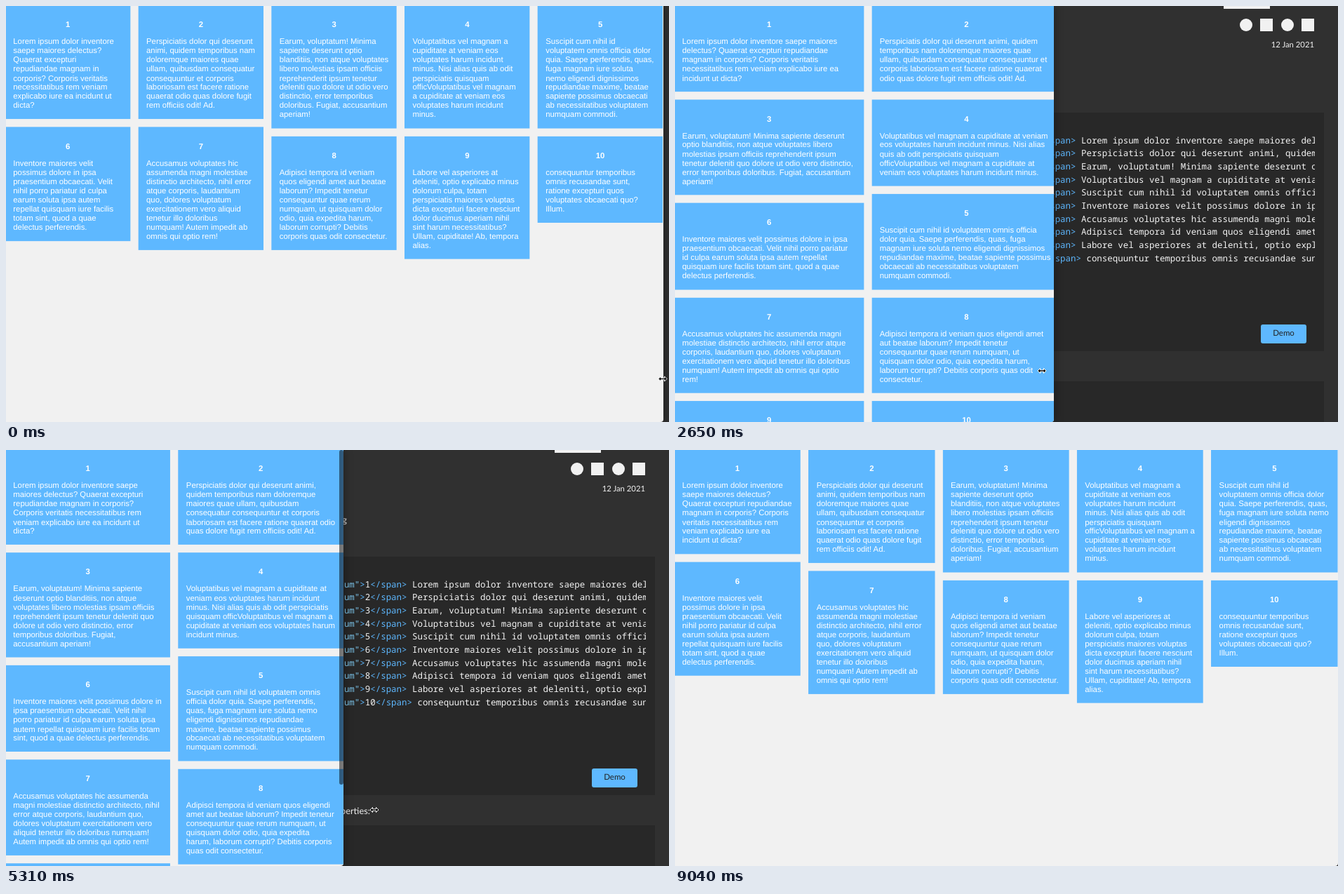
Write an HTML page that moves like this. It is 945 px wide and 593 px high and loops after 9.51 s.

```html
<!DOCTYPE html>
<html lang="en">
<head>
<meta charset="utf-8">
<title>Masonry resize</title>
<style>
  html, body { margin: 0; width: 100%; height: 100%; overflow: hidden; background: #303030; }
  #stage { position: relative; width: 945px; height: 593px; overflow: hidden; background: #303030;
    color: #f1f1f1; font-family: Lato, sans-serif; text-rendering: geometricPrecision; }
  #stage > *, .abs { position: absolute; }
  .block { left: 0; width: 925px; background: #282828; }
  .para { font-size: 12.8px; line-height: 18px; white-space: nowrap; }
  .icon { top: 18px; width: 18px; height: 18px; background: #f1f1f1; }
  .round { border-radius: 50%; }
  pre { margin: 0; overflow: hidden; font: 12.45px/18.65px "Noto Sans Mono", monospace; color: #f4f4f4; }
  pre b { font-weight: 400; color: #5eb8ff; }
  pre i { font-style: normal; color: #9fc67c; }
  pre u { text-decoration: none; color: #7cc4ea; }
  #demo { left: 835px; top: 454px; width: 65px; height: 26.5px; border-radius: 3px; background: #5eb8ff;
    color: #222; font-size: 11.5px; line-height: 26px; text-align: center; }
  #win { left: 0; top: 0; height: 593px; overflow: hidden; background: #f1f1f1;
    border-bottom-right-radius: 4px; box-shadow: 0 0 14px rgba(0, 0, 0, .4); }
  #grid { position: absolute; left: -.6px; top: -1.1px; transform: scale(.7077); transform-origin: 0 0; }
  .card { position: absolute; left: 0; top: 0; box-sizing: border-box; padding: 65px 16px 17px;
    background: #5eb8ff; color: #fff; font: 16px/18.4px "Liberation Sans", Arial, sans-serif; }
  .card b { position: absolute; left: 0; right: 0; top: 31px; text-align: center; }
  #thumb { position: absolute; top: 0; width: 6px; border-radius: 3px; background: rgba(0, 0, 0, .5); }
  #cursor { left: -7px; top: -5px; width: 14px; height: 10px; overflow: visible; }
</style>
</head>
<body>
<div id="stage">
  <div class="block" style="top:152px;height:340px"></div>
  <div class="block" style="top:535px;height:58px"></div>
  <div style="left:782px;top:-62px;width:66px;height:66px;background:#f1f1f1"></div>
  <div class="icon round" style="left:805px"></div>
  <div class="icon" style="left:834px"></div>
  <div class="icon round" style="left:864px"></div>
  <div class="icon" style="left:893px"></div>
  <div class="para" style="right:34px;top:47px;font-size:11.3px">12 Jan 2021</div>
  <div class="para" style="right:459px;top:90px">Bricks that share sizes and other config</div>
  <div class="para" style="right:492px;top:122px">Make these changes to the css:</div>
  <div class="para" style="right:426px;top:505px">We make use of some column properties:</div>
  <pre id="code" style="left:205.7px;top:164px;width:706px"></pre>
  <pre style="right:589px;top:560px;text-align:right">vertical<b>;</b></pre>
  <pre style="right:596px;top:578.6px;text-align:right">16px<b>;</b></pre>
  <div id="demo">Demo</div>
  <div id="win"><div id="grid"></div><div id="thumb"></div></div>
  <svg id="cursor" viewBox="-7 -5 14 10">
    <path d="M-6 0L-2.5-3.6V-1.2H2.5V-3.6L6 0L2.5 3.6V1.2H-2.5V3.6Z" fill="#000" stroke="#fff" stroke-width="1"/>
  </svg>
</div>
<script>
const texts = [
  'Lorem ipsum dolor inventore saepe maiores delectus? Quaerat excepturi repudiandae magnam in corporis? Corporis veritatis necessitatibus rem veniam explicabo iure ea incidunt ut dicta?',
  'Perspiciatis dolor qui deserunt animi, quidem temporibus nam doloremque maiores quae ullam, quibusdam consequatur consequuntur et corporis laboriosam est facere ratione quaerat odio quas dolore fugit rem officiis odit! Ad.',
  'Earum, voluptatum! Minima sapiente deserunt optio blanditiis, non atque voluptates libero molestias ipsam officiis reprehenderit ipsum tenetur deleniti quo dolore ut odio vero distinctio, error temporibus doloribus. Fugiat, accusantium aperiam!',
  'Voluptatibus vel magnam a cupiditate at veniam eos voluptates harum incidunt minus. Nisi alias quis ab odit perspiciatis quisquam officVoluptatibus vel magnam a cupiditate at veniam eos voluptates harum incidunt minus.',
  'Suscipit cum nihil id voluptatem omnis officia dolor quia. Saepe perferendis, quas, fuga magnam iure soluta nemo eligendi dignissimos repudiandae maxime, beatae sapiente possimus obcaecati ab necessitatibus voluptatem numquam commodi.',
  'Inventore maiores velit possimus dolore in ipsa praesentium obcaecati. Velit nihil porro pariatur id culpa earum soluta ipsa autem repellat quisquam iure facilis totam sint, quod a quae delectus perferendis.',
  'Accusamus voluptates hic assumenda magni molestiae distinctio architecto, nihil error atque corporis, laudantium quo, dolores voluptatum exercitationem vero aliquid tenetur illo doloribus numquam! Autem impedit ab omnis qui optio rem!',
  'Adipisci tempora id veniam quos eligendi amet aut beatae laborum? Impedit tenetur consequuntur quae rerum numquam, ut quisquam dolor odio, quia expedita harum, laborum corrupti? Debitis corporis quas odit consectetur.',
  'Labore vel asperiores at deleniti, optio explicabo minus dolorum culpa, totam perspiciatis maiores voluptas dicta excepturi facere nesciunt dolor ducimus aperiam nihil sint harum necessitatibus? Ullam, cupiditate! Ab, tempora alias.',
  'consequuntur temporibus omnis recusandae sunt, ratione excepturi quos voluptates obcaecati quo? Illum.'
];

const SCALE = .7077, GAP = 16, MIN_COL = 250, LOOP = 9510, VIEW = 593;
const $ = id => document.getElementById(id);
const win = $('win'), grid = $('grid'), thumb = $('thumb'), cursor = $('cursor');

const open = (name, cls) =>
  `<b>&lt;${name}</b> <i>class</i><b>=</b><u>"${cls}"</u><b>&gt;</b>`;
$('code').innerHTML = open('div', 'masonry') + '\n' + texts.map((s, i) =>
  '    ' + open('div', 'brick') + open('span', 'num') + (i + 1) + '<b>&lt;/span&gt;</b> ' + s).join('\n');

const cards = texts.map((s, i) => {
  const el = document.createElement('div');
  el.className = 'card';
  el.innerHTML = `<b>${i + 1}</b>${s}`;
  return grid.appendChild(el);
});

// The screen refreshes in runs: first time, last time, number of refreshes.
const runs = [
  [930, 1790, 7], [1940, 1940, 1], [2090, 2650, 5], [2770, 3070, 3], [3190, 4140, 8], [4260, 5160, 7],
  [5310, 6220, 8], [6370, 7310, 7], [7400, 7400, 1], [7520, 7910, 4], [8890, 9040, 2]
];
const ticks = [0];
for (const [a, b, n] of runs)
  for (let i = 0; i < n; i++) ticks.push(n > 1 ? Math.round(a + (b - a) * i / (n - 1)) : a);

// time, window width, layout lag, cursor x, cursor y
const keys = [
  [0, 936.6, 0, 936, 531.5], [800, 936.6, 0, 936, 531.5], [1220, 880, 16, 868, 530],
  [1790, 741, 18.4, 734, 528], [2650, 540, 10.8, 523, 520], [3070, 466, 9, 448, 510],
  [3600, 388, 6, 372, 498], [4140, 338, 0, 326, 490], [4400, 331, 0, 322, 490],
  [4700, 358, 0, 395, 496], [5000, 410, 0, 460, 504], [5310, 481, 0, 525, 513],
  [5800, 604, 0, 650, 521], [6220, 712, 0, 755, 526], [6800, 828, 0, 860, 530],
  [7310, 911, 0, 919, 531], [7910, 944.6, 0, 944, 535], [8889, 944.6, 0, 944, 535],
  [8890, 944.6, 0, 945, 564], [9040, 944.6, 0, 960, 570], [LOOP, 944.6, 0, 960, 570]
];

function pose(t) {
  const i = keys.findIndex(k => k[0] > t), a = keys[i - 1], b = keys[i];
  const f = (t - a[0]) / (b[0] - a[0]);
  return a.map((v, j) => v + (b[j] - v) * f).slice(1);
}

// Each card goes to the shortest column.
function layout(px) {
  const full = px / SCALE;
  const n = Math.max(1, Math.floor((full + GAP) / (MIN_COL + GAP)));
  const w = (full + GAP) / n - GAP;
  for (const c of cards) c.style.width = w + 'px';
  const heights = cards.map(c => c.getBoundingClientRect().height / SCALE);
  const cols = Array(n).fill(0);
  cards.forEach((c, i) => {
    const k = cols.reduce((best, h, j) => h < cols[best] - .5 ? j : best, 0);
    c.style.left = k * (w + GAP) + 'px';
    c.style.top = cols[k] + 'px';
    cols[k] += heights[i] + GAP;
  });
  return Math.max(...cols) * SCALE;
}

let last = -1;
function draw(now) {
  const t = now % LOOP;
  const tick = ticks.filter(v => v <= t).pop();
  if (tick !== last) {
    last = tick;
    const [w, lag, x, y] = pose(tick);
    const full = w + lag;
    win.style.width = w + 'px';
    const total = layout(full + .7);
    thumb.style.display = total > VIEW ? '' : 'none';
    thumb.style.left = full - 6 + 'px';
    thumb.style.height = VIEW * VIEW / total + 'px';
    cursor.style.transform = `translate(${x}px, ${y}px)`;
  }
  requestAnimationFrame(draw);
}
draw(performance.now());
</script>
</body>
</html>
```
